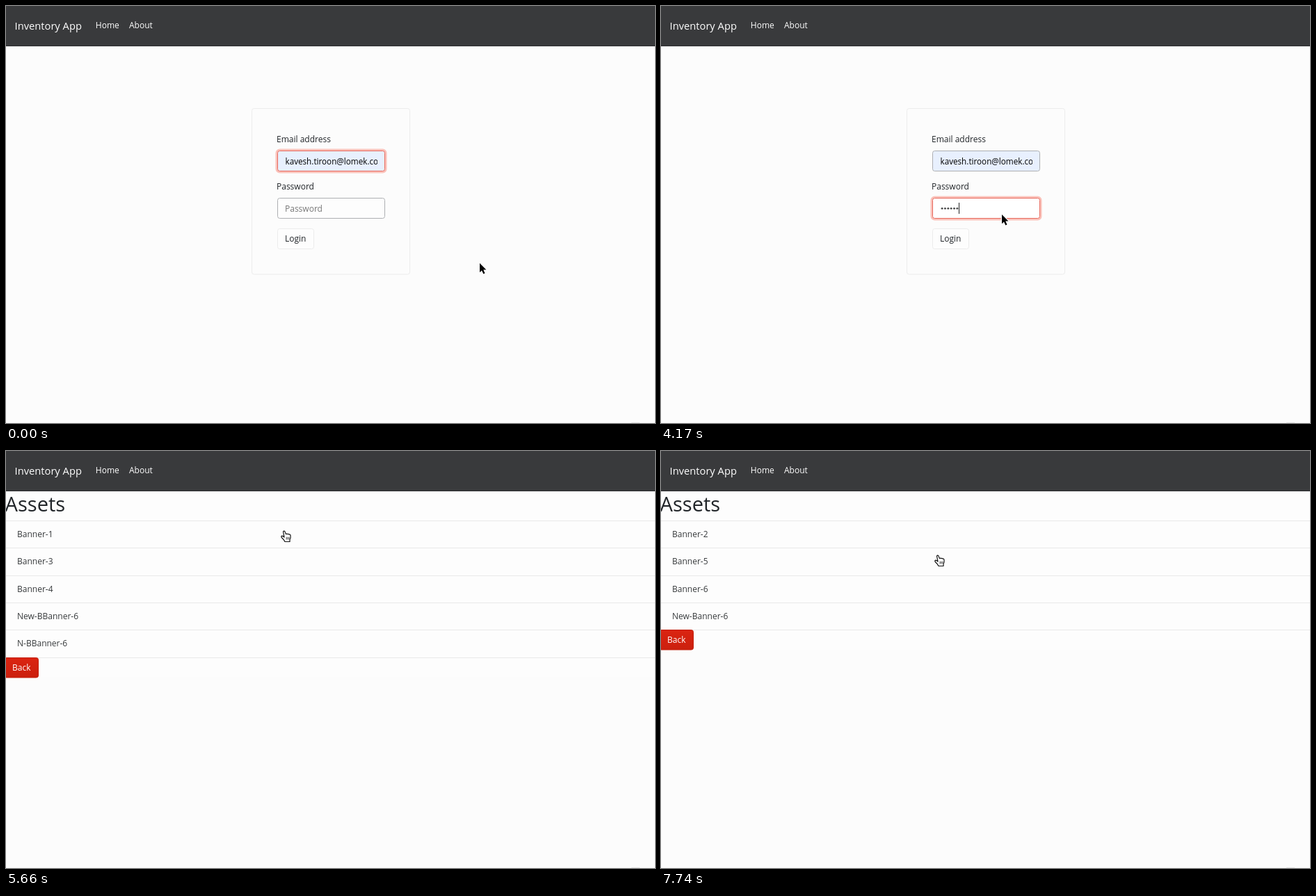
Recreate the animation shown at these times as an HTML page with a canvas. Size 933 by 600 pixels, loop 8 s.

```html
<!DOCTYPE html>
<html lang="en">
<head>
<meta charset="utf-8">
<title>Inventory App</title>
<style>
html, body { margin: 0; width: 100%; height: 100%; overflow: hidden; background: #fcfcfc; }
canvas { display: block; }
</style>
</head>
<body>
<canvas id="stage" width="933" height="600"></canvas>
<script>
const ctx = document.getElementById('stage').getContext('2d');
const LOOP = 8000, TICK = 148.8, ROW = 39.3;
const INK = '#212529';

const MALLS = ['Tilvari Mall', 'Denovah Kelor Mall'];
const ASSETS_A = ['Banner-1', 'Banner-3', 'Banner-4', 'New-BBanner-6', 'N-BBanner-6'];
const ASSETS_B = ['Banner-2', 'Banner-5', 'Banner-6', 'New-Banner-6'];

// [first tick, heading, rows]
const PAGES = [
  [30, 'Shopping Centers', []],
  [32, 'Shopping Centers', MALLS],
  [37, 'Assets', []],
  [38, 'Assets', ASSETS_A],
  [44, 'Shopping Centers', []],
  [45, 'Shopping Centers', MALLS],
  [51, 'Assets', []],
  [52, 'Assets', ASSETS_B]
];

// [tick, x, y] of the pointer's hot spot
const POINTER = [
  [0, 681, 370], [6, 497, 297], [7, 497, 297], [8, 496, 297], [11, 496, 297],
  [14, 492, 308], [17, 491, 303], [27, 491, 303], [28, 490, 300], [31, 490, 300],
  [33, 428, 280], [35, 400, 115], [38, 400, 115], [39, 396, 115], [47, 396, 115],
  [50, 398, 150], [54, 398, 150]
];

// [tick, number of typed characters]
const TYPED = [[0, 0], [20, 1], [21, 2], [23, 3], [25, 5], [26, 6]];

const ARROW = new Path2D('M0 0V13.2L3 10.4L5.3 15.5L7.5 14.5L5.3 9.6H9.4Z');
const BEAM = new Path2D('M-3-6.5Q0-6.5 0-5V5Q0 6.5-3 6.5M3-6.5Q0-6.5 0-5M0 5Q0 6.5 3 6.5M-2 3H2');
const HAND = new Path2D('M-1.5 1.2Q-.8-.6.8.6L2.4 4.6Q3.5 3.6 4.6 4.6Q5.8 3.8 6.8 5' +
  'Q8.5 4.6 9 6.5Q9.6 10 8 12.5V15.5H1Q0 13-3.5 9.8Q-5 7.6-3.2 7.2Q-1.8 7.2 0 9Z');
const FINGERS = new Path2D('M3.2 8.8V12.4M5.1 8.8V12.4M7 8.8V12.4');

const last = (list, tick) => list.filter(e => e[0] <= tick).pop();
const mix = (a, b, k) => a + (b - a) * k;

function text(str, x, y, color = INK, size = 12) {
  ctx.font = `${size}px "Open Sans", "Noto Sans", sans-serif`;
  ctx.fillStyle = color;
  ctx.fillText(str, x, y);
}

function rect(x, y, w, h, color) {
  ctx.fillStyle = color;
  ctx.fillRect(x, y, w, h);
}

function box(x, y, w, h, fill, stroke, line = 1) {
  ctx.beginPath();
  ctx.roundRect(x, y, w, h, 3);
  ctx.lineWidth = line;
  if (fill) { ctx.fillStyle = fill; ctx.fill(); }
  if (stroke) { ctx.strokeStyle = stroke; ctx.stroke(); }
}

function field(y, fill, focus) {
  const k = Math.min(1, focus * 2);
  const rgb = [[173, 232], [175, 106], [178, 94]].map(([a, b]) => Math.round(mix(a, b, k)));
  if (focus) box(390.5, y, 154, 29, null, `rgba(250,180,170,${focus * focus * .8})`, 6);
  box(390.5, y, 154, 29, fill, `rgb(${rgb})`);
}

function navbar() {
  rect(0, 0, 933, 58, '#393a3c');
  rect(0, 57, 933, 1, '#2d2e30');
  text('Inventory App', 12.6, 34, '#fff', 14.7);
  text('Home', 128.8, 32, '#fff');
  text('About', 177, 32, '#fff');
}

function login(tick) {
  const emailFocus = tick < 10 ? 1 : tick < 11 ? .3 : 0;
  const passFocus = tick < 10 ? 0 : tick < 11 ? .65 : 1;
  const typed = last(TYPED, tick)[1];
  const caret = tick >= 10 && !(tick >= 14 && tick < 17);

  box(353.5, 147.5, 227, 238.5, null, '#ececec');
  text('Email address', 389, 196);
  field(208.5, '#e8f0fe', emailFocus);
  ctx.save();
  ctx.beginPath();
  ctx.rect(401, 209, 133, 28);
  ctx.clip();
  text('kavesh.tiroon@lomek.co', 401.5, 227.5, '#000', 11.7);
  ctx.restore();

  text('Password', 389, 264);
  field(276.5, passFocus ? '#fff' : '#fdfdfd', passFocus);
  if (!typed) text('Password', 401, 295.5, '#777');
  for (let i = 0; i < typed; i++) {
    ctx.beginPath();
    ctx.arc(404.1 + i * 4.35, 291.3, 1.4, 0, 7);
    ctx.fillStyle = '#444';
    ctx.fill();
  }
  if (caret) rect(Math.floor(402 + typed * 4.35), 283, 1, 16, '#222');

  box(390.5, 320.5, 52, 29, '#fdfdfd', '#ececec');
  text('Login', 401, 339);
}

function listing(title, rows) {
  rect(0, 58, 933, 71 + rows.length * ROW, '#fdfdfd');
  text(title, -1.5, 87, INK, 29.1);
  rows.forEach((row, i) => {
    rect(0, Math.round(100 + i * ROW), 933, 1, '#e9e9e9');
    text(row, 16, 124 + i * ROW, '#373a3c');
  });
  const y = Math.round(100 + rows.length * ROW);
  if (rows.length) rect(0, y, 933, 1, '#e9e9e9');
  const red = ctx.createLinearGradient(0, y, 0, y + 29);
  red.addColorStop(0, '#db2411');
  red.addColorStop(1, '#cb200e');
  box(-2.5, y + .5, 49, 28.5, red, '#c41f0d');
  text('Back', 9, y + 18.5, '#fff');
}

function pointer(tick) {
  const i = POINTER.findIndex(p => p[0] > tick);
  const [t0, x0, y0] = POINTER[i - 1], [t1, x1, y1] = POINTER[i];
  const k = (tick - t0) / (t1 - t0);
  const draw = (path, color, width) => {
    ctx.strokeStyle = color;
    ctx.lineWidth = width;
    ctx.stroke(path);
  };
  ctx.save();
  ctx.lineJoin = 'round';
  ctx.translate(Math.round(mix(x0, x1, k)), Math.round(mix(y0, y1, k)));
  if (tick >= 6 && tick < 13) {
    draw(BEAM, '#fff', 3);
    draw(BEAM, '#111', 1.3);
  } else if (tick >= 35) {
    draw(HAND, '#fff', 2.4);
    ctx.fillStyle = '#fff';
    ctx.fill(HAND);
    draw(HAND, '#111', 1.2);
    draw(FINGERS, '#111', .8);
  } else {
    draw(ARROW, '#fff', 2.4);
    ctx.fillStyle = '#000';
    ctx.fill(ARROW);
  }
  ctx.restore();
}

function frame(now) {
  const tick = Math.floor((now % LOOP + 2) / TICK);
  rect(0, 0, 933, 600, '#fcfcfc');
  rect(899, 599, 12, 1, '#e6e6e6');
  const page = last(PAGES, tick);
  if (page) listing(page[1], page[2]);
  else login(tick);
  navbar();
  pointer(tick);
}

const start = performance.now();
(function loop() {
  frame(performance.now() - start);
  requestAnimationFrame(loop);
})();
</script>
</body>
</html>
```
